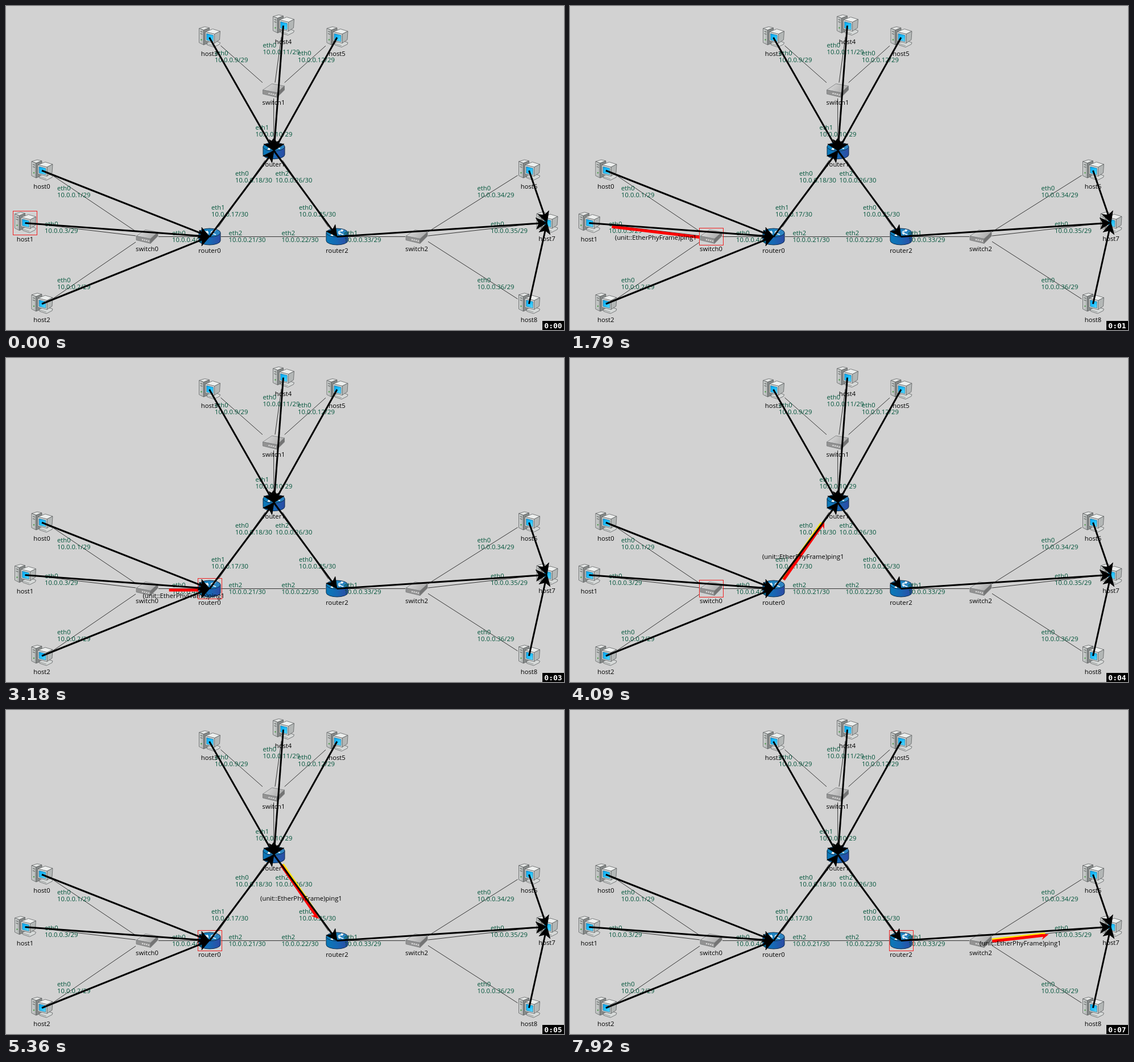
An HTML page with a canvas for the animation above (8000 ms loop, 981 px wide and 571 px high).

```html
<!DOCTYPE html>
<html lang="en">
<head>
<meta charset="utf-8">
<title>Network ping</title>
<style>
html, body { margin: 0; width: 100%; height: 100%; overflow: hidden; background: #d2d2d2; }
canvas { display: block; }
</style>
</head>
<body>
<canvas id="stage" width="981" height="571"></canvas>
<script>
const ctx = document.getElementById('stage').getContext('2d');
const LOOP = 8000, STEP = 116;
const FONT = '11.3px "Open Sans", "Noto Sans", sans-serif';

// Icon half sizes and label baseline below the centre.
const KINDS = {
  host: { w: 20, h: 20, label: 32, draw: drawHost },
  switch: { w: 20, h: 14, label: 25, draw: drawSwitch },
  router: { w: 20, h: 17, label: 28, draw: drawRouter }
};

const nodes = {};
function addNodes(kind, places) {
  places.forEach(([x, y], i) => { nodes[kind + i] = { x, y, kind: KINDS[kind] }; });
}
addNodes('host', [[63, 290], [33.5, 382.5], [63, 525], [357.5, 55.5], [487.5, 34.5],
  [582, 55.5], [919.5, 290], [951, 382], [919.5, 525]]);
addNodes('switch', [[248, 406.5], [470.5, 149], [722, 406.5]]);
addNodes('router', [[358, 406.5], [471, 255], [582, 406.5]]);

const pairs = text => text.split(' ').map(p => p.split('-'));
const links = pairs('host0-switch0 host1-switch0 host2-switch0 switch0-router0 ' +
  'host3-switch1 host4-switch1 host5-switch1 switch1-router1 router0-router1 ' +
  'router1-router2 router0-router2 router2-switch2 switch2-host6 switch2-host7 switch2-host8');
const routes = pairs('host0-router0 host1-router0 host2-router0 host3-router1 ' +
  'host4-router1 host5-router1 router0-router1 router1-router2 router2-host7 ' +
  'host6-host7 host8-host7');

// x, baseline, interface number, address ending
const ports = [
  [90, 325, 0, '1/29'], [68, 388, 0, '3/29'], [90, 487, 0, '2/29'],
  [367, 87, 0, '9/29'], [451.5, 73, 0, '11/29'], [513, 87, 0, '12/29'],
  [828.5, 325, 0, '34/29'], [852, 388, 0, '35/29'], [828.5, 487, 0, '36/29'],
  [292, 404, 0, '4/29'], [361, 359, 1, '17/30'], [391.5, 404, 2, '21/30'],
  [438.5, 218, 1, '10/29'], [403, 299, 0, '18/30'], [473.5, 299, 2, '26/30'],
  [515, 359, 0, '25/30'], [484.5, 404, 2, '22/30'], [594.5, 404, 1, '33/29']
];

// Each hop: head travels, both ends rest, tail follows.
const GROW = 800, REST = 187, SHRINK = 300;
const hops = [
  [750, 'host1', 'switch0'], [2097, 'switch0', 'router0'], [3384, 'router0', 'router1'],
  [4718, 'router1', 'router2'], [6057, 'router2', 'switch2'], [7499, 'switch2', 'host7']
];
const focus = [
  [0, 'host1'], [1760, 'switch0'], [2150, 'host1'], [2950, 'switch0'], [3084, 'router0'],
  [3450, 'switch0'], [4184, 'router0'], [4371, 'router1'], [4760, 'router0'],
  [5518, 'router1'], [5705, 'router2'], [6110, 'router1'], [6600, 'switch2'],
  [6857, 'router2'], [7044, 'switch2'], [7520, 'router2']
];

const lastBefore = (table, t) => table.filter(row => row[0] <= t).pop();
const clamp = v => Math.max(0, Math.min(1, v));

function poly(points, fill, stroke) {
  ctx.beginPath();
  for (let i = 0; i < points.length; i += 2) ctx.lineTo(points[i], points[i + 1]);
  ctx.closePath();
  ctx.fillStyle = fill;
  ctx.fill();
  if (stroke) {
    ctx.strokeStyle = stroke;
    ctx.lineWidth = 0.8;
    ctx.stroke();
  }
}

function line(x1, y1, x2, y2, color, width) {
  ctx.beginPath();
  ctx.moveTo(x1, y1);
  ctx.lineTo(x2, y2);
  ctx.strokeStyle = color;
  ctx.lineWidth = width;
  ctx.stroke();
}

function ellipse(x, y, rx, ry, fill) {
  ctx.beginPath();
  ctx.ellipse(x, y, rx, ry, 0, 0, 7);
  ctx.fillStyle = fill;
  ctx.fill();
}

function write(text, x, y, color, align = 'left') {
  ctx.font = FONT;
  ctx.textAlign = align;
  ctx.fillStyle = color;
  ctx.fillText(text, x, y);
}

function ramp(x1, y1, x2, y2, ...colors) {
  const g = ctx.createLinearGradient(x1, y1, x2, y2);
  colors.forEach((c, i) => g.addColorStop(i / (colors.length - 1), c));
  return g;
}

function drawHost() {
  const edge = '#5d6061';
  // tower
  poly([-18, -16, -8, -19, 0, -17, -10, -13], '#e4e6e5', edge);
  poly([-18, -16, -10, -13, -10, 13, -18, 9], ramp(-18, 0, -10, 0, '#cfd2d1', '#adb1b0'), edge);
  poly([-10, -13, 0, -17, 0, 9, -10, 13], '#868a89', edge);
  line(-16, -11, -12, -9.5, '#606463', 1.2);
  line(-16, -7, -12, -5.5, '#606463', 1.2);
  ellipse(-14, 4, 1.2, 1.2, '#4c9a4a');
  // stand
  poly([-4, 9, 8, 5, 19, 9, 18, 12, 8, 17, -4, 13], '#d6d9d8', edge);
  line(-3, 11, 8, 14.5, '#8e9291', 1);
  // screen
  poly([-7, -10, 6, -15, 19, -11, 9, -6], '#eceeed', edge);
  poly([9, -6, 19, -11, 18, 4, 9, 10], '#b3b7b6', edge);
  poly([-7, -10, 9, -6, 9, 10, -7, 6], '#e3e6e5', edge);
  poly([-5, -7, 7, -4, 7, 7.5, -5, 4.5], ramp(-5, -6, 7, 7, '#08a3ea', '#1fc0ff', '#62dcff'), '#42728a');
}

function drawSwitch() {
  const edge = '#77797a';
  poly([-19, -1, -3, -12, 19, -8, 6, 4], ramp(-10, -8, 8, 4, '#d0d0d0', '#b0b0b0'), edge);
  poly([-19, -1, 6, 4, 6, 12, -19, 6], '#939393', edge);
  poly([6, 4, 19, -8, 19, -1, 6, 12], '#747474', edge);
  for (let i = 0; i < 4; i++) {
    const x = -9 + i * 3.6;
    line(x, 5 + i * 0.8, x + 2.2, 5.5 + i * 0.8, '#e2e2e2', 2);
  }
}

function arrowMark(x1, y1, x2, y2) {
  line(x1, y1, x2, y2, '#fff', 1.7);
  const a = Math.atan2(y2 - y1, x2 - x1);
  ctx.save();
  ctx.translate(x2, y2);
  ctx.rotate(a);
  poly([3, 0, -1.5, -2.6, -1.5, 2.6], '#fff');
  ctx.restore();
}

function drawRouter() {
  ctx.beginPath();
  ctx.moveTo(-19, -7);
  ctx.lineTo(-19, 7);
  ctx.ellipse(0, 7, 19, 7.5, 0, Math.PI, 0, true);
  ctx.lineTo(19, -7);
  ctx.closePath();
  ctx.fillStyle = ramp(-19, 0, 19, 0, '#087ab8', '#1768b4', '#2c4ba4');
  ctx.fill();
  ctx.strokeStyle = '#0b2c4e';
  ctx.lineWidth = 1;
  ctx.stroke();
  ellipse(0, -7, 19, 7.5, ramp(-19, 0, 19, 0, '#0b82bd', '#3184c3'));
  ctx.stroke();
  arrowMark(-11, -10.5, -4, -8);
  arrowMark(11, -3.5, 4, -6);
  arrowMark(2, -8.5, 9, -11);
  arrowMark(-2, -5.5, -9, -3);
}

// Link end at the icon of a; links run a little steeper than centre to centre.
const STEEP = 1.07;
function exit(a, b) {
  const dx = (a.x - b.x) / 2, dy = (a.y - b.y) / 2;
  const s = Math.max(
    (Math.abs(dx) - a.kind.w) / Math.abs(dx || 1),
    (Math.abs(dy) - a.kind.h) / Math.abs(dy * STEEP || 1));
  return { x: b.x + dx * (1 + s), y: b.y + dy * (1 + s * STEEP) };
}

function drawNetwork() {
  ctx.fillStyle = '#d2d2d2';
  ctx.fillRect(0, 0, 981, 571);
  for (const [from, to] of links) {
    const a = exit(nodes[from], nodes[to]), b = exit(nodes[to], nodes[from]);
    line(a.x, a.y, b.x, b.y, '#222', 0.9);
  }
  for (const name in nodes) {
    const { x, y, kind } = nodes[name];
    ctx.save();
    ctx.translate(x, y);
    kind.draw();
    ctx.restore();
    write(name, x, y + kind.label, '#000', 'center');
  }
  for (const [x, y, n, end] of ports) {
    write('eth' + n, x, y, '#00543a');
    write('10.0.0.' + end, x, y + 12, '#00543a');
  }
}

function drawFocus(name) {
  const { x, y, kind } = nodes[name];
  const w = kind.w + 1, h = kind.h + 1;
  ctx.strokeStyle = '#f02020';
  ctx.lineWidth = 1;
  ctx.strokeRect(Math.floor(x - w) + 0.5, Math.floor(y - h) + 0.5, w * 2, h * 2);
}

function drawPacket(t, active) {
  const hop = lastBefore(hops, t);
  if (!hop) return;
  const [start, from, to] = hop;
  const a = exit(nodes[from], nodes[to]), b = exit(nodes[to], nodes[from]);
  const age = t - start;
  const head = clamp(age / GROW), tail = clamp((age - GROW - REST) / SHRINK);
  if (tail >= 1 || head <= 0) return;

  const dx = b.x - a.x, dy = b.y - a.y, full = Math.hypot(dx, dy);
  const x0 = full * tail, x1 = full * head;
  ctx.save();
  ctx.translate(a.x, a.y);
  ctx.rotate(Math.atan2(dy, dx));
  if (head < 1) {
    if (active !== to) line(x0, -1, x1 - 6, -1, '#ffe600', 3);
    poly([x0, 0, x1 - 12, 0, x1, 1.5, x1 - 13, 10, x1 - 10, 5, x0, 5], '#f00');
  } else {
    poly([x0, 0, x1, 0, x1, 5, x0, 5], '#f00');
  }
  ctx.restore();
  const mid = (head + tail) / 2;
  write('(unit::EtherPhyFrame)ping1', a.x + dx * mid, a.y + dy * mid + 16, '#000', 'center');
}

function drawRoutes() {
  for (const [from, to] of routes) {
    const a = nodes[from], b = nodes[to];
    const dx = b.x - a.x, dy = b.y - a.y, len = Math.hypot(dx, dy);
    ctx.save();
    ctx.translate(b.x, b.y);
    ctx.rotate(Math.atan2(dy, dx));
    line(-len, 0, -10, 0, '#000', 3);
    poly([0, 0, -19, -10, -14, 0, -19, 10], '#000', '#000');
    ctx.restore();
  }
}

function drawClock(t) {
  ctx.fillStyle = '#000';
  ctx.fillRect(943, 555, 38, 16);
  ctx.font = 'bold 13px "DejaVu Sans Mono", monospace';
  ctx.textAlign = 'center';
  ctx.fillStyle = '#fff';
  ctx.fillText('0:0' + Math.floor(t / 1000), 962, 568);
}

function draw(t) {
  const active = lastBefore(focus, t)[1];
  drawNetwork();
  drawFocus(active);
  drawPacket(t, active);
  drawRoutes();
  drawClock(t);
}

// The picture moves in even steps after an opening pause.
const stepped = t => t < 942 ? 0 : 960 + STEP * Math.floor((t - 942) / STEP);

const origin = performance.now();
let shown = -1;
function tick() {
  const t = stepped((performance.now() - origin) % LOOP);
  if (t !== shown) draw(shown = t);
  requestAnimationFrame(tick);
}
tick();
</script>
</body>
</html>
```
